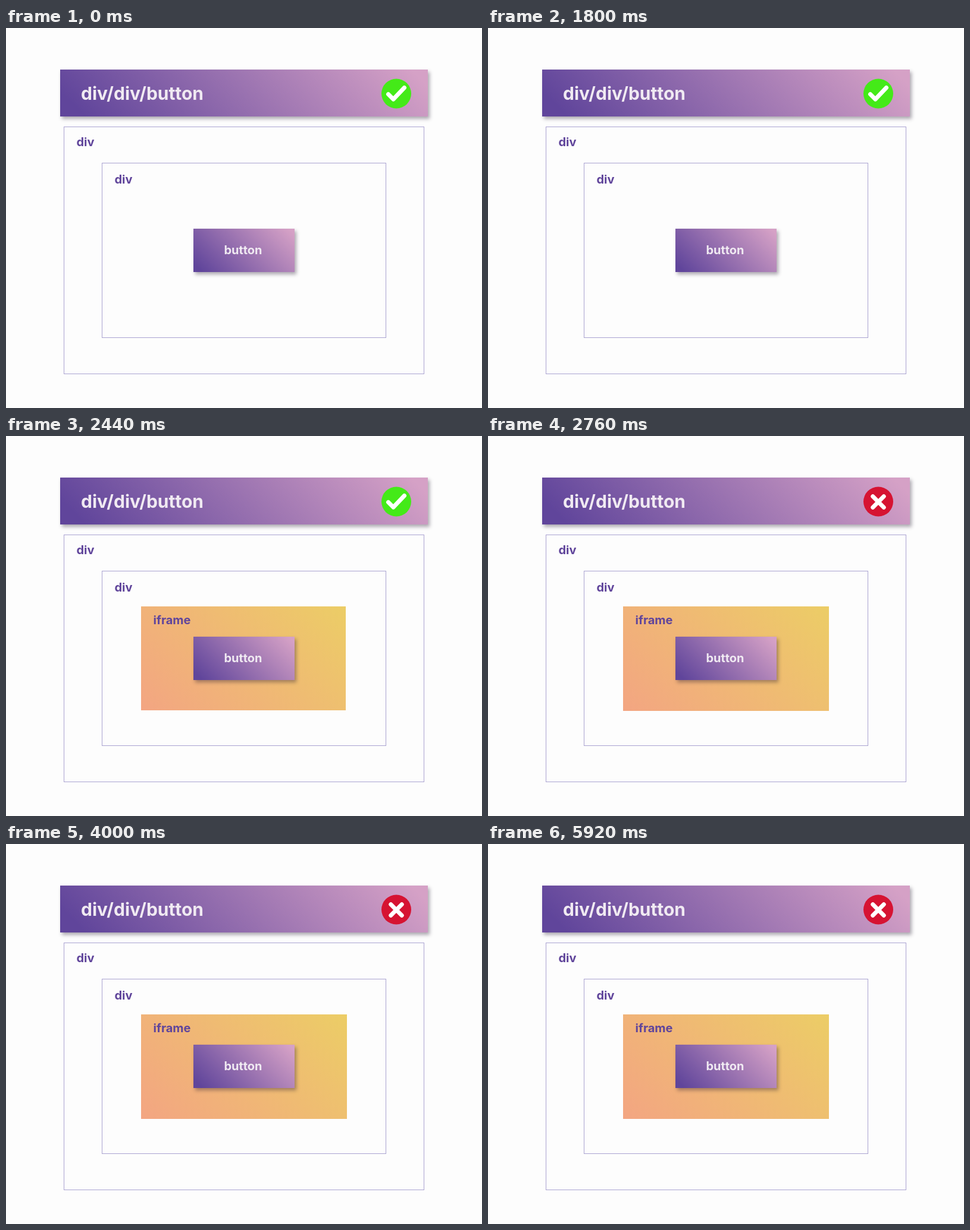
An HTML page that plays this animation: 800 px wide and 640 px high, repeating every 6080 ms.

```html
<!DOCTYPE html>
<html lang="en">
<head>
<meta charset="utf-8">
<title>Nested elements</title>
<style>
  html, body { margin: 0; width: 100%; height: 100%; overflow: hidden; background: #fdfdfd; }
  #stage { position: relative; width: 800px; height: 640px; overflow: hidden; }
  #stage > * { position: absolute; box-sizing: border-box; }
  .outline { border: 1px solid #aaa3d1; }
  .raised {
    background: linear-gradient(45deg, #60459b 6%, #d5a1c6 96%);
    box-shadow: 3px 4px 6px rgba(40, 30, 50, .38);
  }
  #bar { left: 91px; top: 70px; width: 618px; height: 78.5px; }
  #outer { left: 97px; top: 166px; width: 606px; height: 417px; }
  #inner { left: 161px; top: 227px; width: 478px; height: 295px; }
  #frame {
    left: 227px; top: 286.5px; width: 346px; height: 175.5px;
    background: linear-gradient(45deg, #f3a582, #eccd66);
    transform: scale(0); transform-origin: 0 0;
  }
  #button { left: 315px; top: 337.5px; width: 170px; height: 73.5px; }
  svg { left: 0; top: 0; }
  text { font: 700 20px Inter, "Open Sans", sans-serif; fill: #60459b; }
  .light { fill: #f0eaf2; }
  .title { font-size: 30px; }
  .mark { fill: none; stroke: #fff; stroke-width: 7; stroke-linecap: round; stroke-linejoin: round; }
</style>
</head>
<body>
<div id="stage">
  <div id="bar" class="raised"></div>
  <div id="outer" class="outline"></div>
  <div id="inner" class="outline"></div>
  <div id="frame"></div>
  <div id="button" class="raised"></div>
  <svg width="800" height="640" viewBox="0 0 800 640">
    <text class="light title" x="126" y="120.5">div/div/button</text>
    <text x="118.5" y="199">div</text>
    <text x="182.5" y="262">div</text>
    <text id="label" x="247.5" y="317" opacity="0">iframe</text>
    <text class="light" x="398.5" y="381" text-anchor="middle">button</text>
    <g id="pass">
      <circle cx="656" cy="110.5" r="25" fill="#44ea18"/>
      <path class="mark" d="M642.5 111.5l8.5 8.5 18.5-19.5"/>
    </g>
    <g id="fail" visibility="hidden">
      <circle cx="656" cy="110.5" r="25" fill="#d61332"/>
      <path class="mark" d="M646.8 101.8l18.4 18.4M665.2 101.8l-18.4 18.4"/>
    </g>
  </svg>
</div>
<script>
  const LOOP = 6080, STEP = 40;
  const [frame, label, pass, fail] =
    ["frame", "label", "pass", "fail"].map(id => document.getElementById(id));
  const progress = (t, start, length) => Math.min(1, Math.max(0, (t - start) / length));
  const ease = p => p * p * (3 - 2 * p);
  const show = (node, on) => node.setAttribute("visibility", on ? "visible" : "hidden");

  // Motion advances in 25 fps steps.
  function draw(now) {
    const t = Math.floor((now % LOOP) / STEP) * STEP;
    const broken = t >= 2640;
    frame.style.transform = `scale(${ease(progress(t, 1986, 475))})`;
    label.setAttribute("opacity", progress(t, 2000, 400));
    show(pass, !broken);
    show(fail, broken);
  }

  const start = performance.now();
  function tick() {
    draw(performance.now() - start);
    requestAnimationFrame(tick);
  }
  tick();
</script>
</body>
</html>
```
